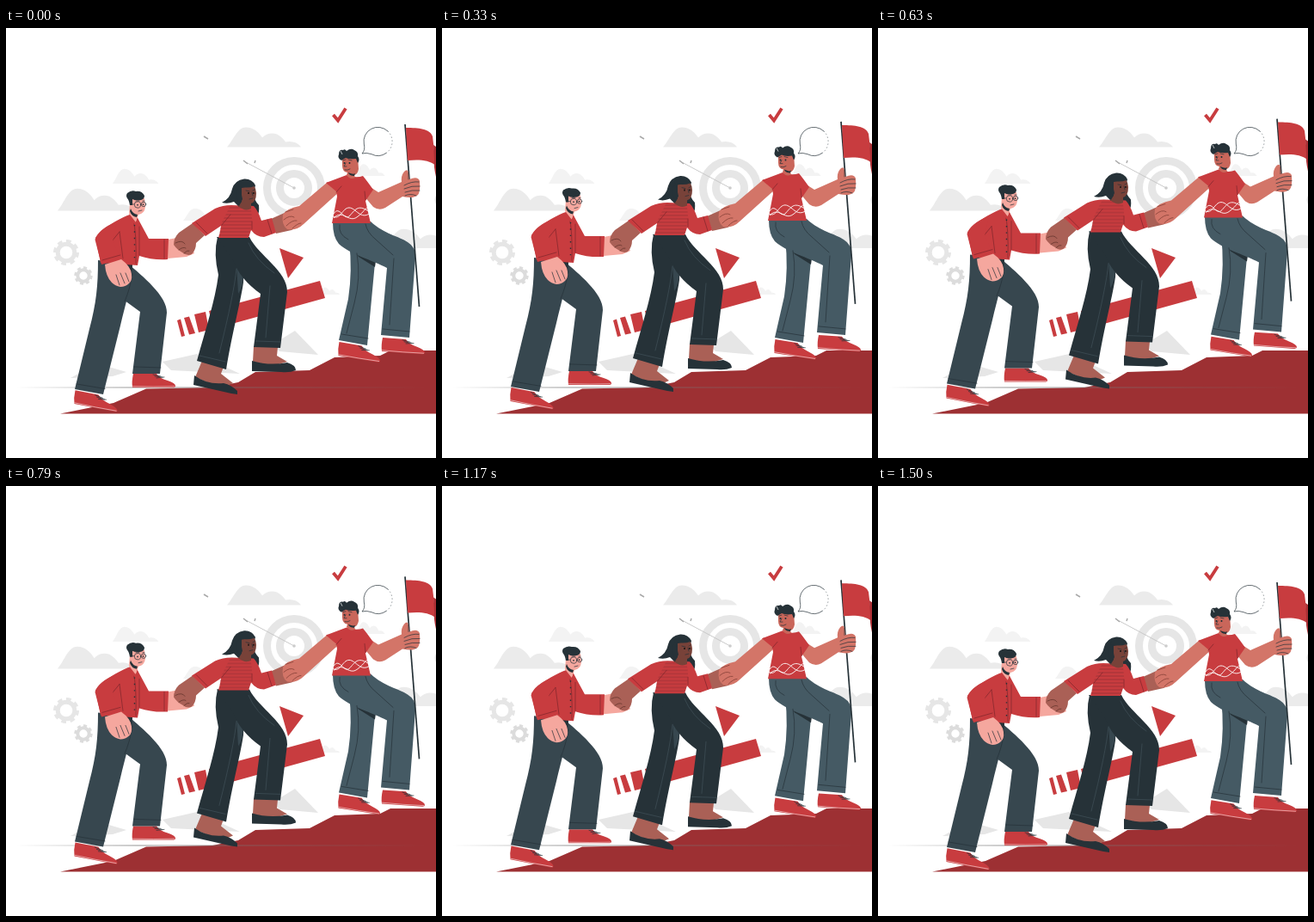
Write an HTML page that moves like this. It is 500 by 500 pixels and loops after 1540 ms.

```html
<!DOCTYPE html>
<html lang="en">
<head>
<meta charset="utf-8">
<title>Climbing together</title>
<style>
  html, body { margin: 0; height: 100%; overflow: hidden; background: #fff; }
  svg { display: block; width: 100vw; height: 100vh; }
  .red { fill: #c83c3f; }
  .dark { fill: #263238; }
  .slate { fill: #37474f; }
  .blue { fill: #455a64; }
  .pink { fill: #f5a79e; }
  .brown { fill: #aa6056; }
  .deep { fill: #784239; }
  .tan { fill: #d37568; }
  .gray { fill: #ebebeb; }
  .line { fill: none; stroke: #263238; stroke-width: .7; stroke-linecap: round; stroke-linejoin: round; }
  .seam { stroke: #7d262c; }
  .white { fill: none; stroke: #fff; stroke-width: .9; }
  .ring { fill: none; stroke: #e6e6e6; }
</style>
</head>
<body>
<svg viewBox="0 0 500 500">
  <defs>
    <linearGradient id="fade">
      <stop offset="0" stop-color="#777" stop-opacity="0"/>
      <stop offset=".3" stop-color="#777" stop-opacity=".8"/>
      <stop offset=".6" stop-color="#777" stop-opacity=".5"/>
      <stop offset="1" stop-color="#777" stop-opacity="0"/>
    </linearGradient>
    <pattern id="stripes" width="10" height="4" patternUnits="userSpaceOnUse">
      <path d="M0 1H10" stroke="#8f2c32" stroke-width=".7"/>
    </pattern>
    <path id="cloud" d="M0 0C8-9 12-23 22-23C31-23 37-17 41-11Q48-18 58-15Q64-12 68-6Q80-8 86 0Z"/>
    <g id="sneaker">
      <path class="red" d="M1 0L28 0Q31 5 41 8Q50 11 50 14Q50 16 47 16H0Q-1 9 1 0Z"/>
      <path class="white" d="M0 14.800Q25 15.500 49 14.800" stroke-width=".5" style="stroke-width:.5"/>
      <path class="line" d="M24 1L33 3M26 3L35 4M28 5L37 4"/>
    </g>
  </defs>

  <g class="gray">
    <use href="#cloud" x="257" y="138.500"/>
    <use href="#cloud" transform="translate(124 181) scale(.62 .75)" fill="#f3f3f3"/>
    <use href="#cloud" transform="translate(60 212.500) scale(1.04 1.12)"/>
    <use href="#cloud" transform="translate(407 172) scale(.39 .6)" fill="#f3f3f3"/>
    <use href="#cloud" transform="translate(440 256) scale(1.02 .97)"/>
    <use href="#cloud" transform="translate(365 310) scale(.27 .37)" fill="#f3f3f3"/>
    <use href="#cloud" transform="translate(206 224) scale(.62)" fill="#f3f3f3"/>
    <path d="M500 195Q497 199 500 205Z"/>
    <path fill="#e6e6e6" d="M75 407L106 390L140 400L124 405ZM182 388L222 379L272 402L192 398ZM310 368L336 352L363 380L318 376Z"/>
  </g>
  <circle class="ring" cx="335" cy="186" r="31.500" stroke-width="9"/>
  <circle class="ring" cx="335" cy="186" r="16.500" stroke-width="9"/>
  <path d="M277 155L335 186" stroke="#c4c4c4" stroke-width=".9"/>
  <circle cx="335" cy="186" r="1.800" fill="#ccc"/>
  <path d="M276 154L281 158M289 157L290 154M230 126L235 129" stroke="#aaa" stroke-width="1.500"/>

  <g fill="none" stroke="#e6e6e6">
    <circle cx="70" cy="261" r="9.800" stroke-width="5"/>
    <circle cx="70" cy="261" r="13" stroke-width="4" pathLength="16" stroke-dasharray="1.1 .9"/>
    <g stroke="#dcdcdc">
      <circle cx="90" cy="288" r="6.700" stroke-width="4"/>
      <circle cx="90" cy="288" r="9.200" stroke-width="3" pathLength="16" stroke-dasharray="1.1 .9"/>
    </g>
  </g>

  <path d="M380.500 101L386 107.500L395 93.500" fill="none" stroke="#c83c3f" stroke-width="3.800"/>
  <path class="line" d="M442 145.500A16.500 16.500 0 0 1 425 146.700Q419 144.500 414 146Q418 142 416.300 135A16.500 16.500 0 0 1 444 120"/>
  <path class="line" d="M444 120A16.500 16.500 0 0 1 442 145.500" stroke-dasharray="1 3" opacity=".6"/>

  <path class="red" d="M199 340L203 338.500L208 358L204 359ZM207 337L213 335.500L220 355L213 356.500ZM219 333L232 330L236 351L224 354ZM236 329L365 294L371 314L241 350ZM318 256L346 267L328 291Z"/>
  <path fill="#9d3033" d="M63 448.500L125 436L163 419.500L240 418L270 412L290 400L353 398L382 383L435 381L447 375H500V448.500Z"/>
  <path fill="url(#fade)" d="M12 417.500H490V418.500H12Z"/>

  <g id="team">
    <!-- man with glasses -->
    <g>
      <use href="#sneaker" x="147" y="402"/>
      <use href="#sneaker" transform="translate(79.500 421) skewY(11)"/>
      <path class="slate" d="M142 274C158 288 188 312 187 331L179 402L147 402L156 330L134 314Z"/>
      <path class="slate" d="M107 270L147 275C146 300 139 320 133 346L113 426L80 420L97 350C105 320 107 300 107 270Z"/>
      <path class="line" d="M149 394L180 395M82 414L115 419.500M147 286Q144 304 138 318"/>
      <path class="dark" d="M134 272L147 274L146 288Q140 296 134 291Z"/>
      <path class="pink" d="M188 246L204 243Q216 254 219 262L210 266L188 268Z"/>
      <path class="red" d="M141 218L152 219L166 245L189 245L188 269Q170 270 155 265L153 276L110 273L104 244C112 232 130 223 141 218Z"/>
      <path class="line seam" d="M148 222Q152 240 151 274M184 246L184 268M155 231L155 264M123 248L132 237M132 237L136 268"/>
      <path d="M149.500 229V272" stroke="#263238" stroke-width="1.400" stroke-dasharray="1.400 6"/>
      <path class="red" d="M129 225Q107 234 103.500 246L111 275L134 269L124 248Z"/>
      <path class="line seam" d="M112 270L133 264"/>
      <path class="pink" d="M115 275L134 269Q145 277 146 286Q147 294 143 297Q139 301 133 301Q127 300 123 296Q116 289 115 275Z"/>
      <path class="line" d="M128 287L132 299M133 285L138 297M139 285L143 295"/>
      <g class="head">
        <path class="pink" d="M144 204L143 216Q146 225 151 226L154 217Q161 216 162 208L161 198L145 198Z"/>
        <path class="dark" d="M145 210Q147 216 153 217L152 220Q146 219 144 213ZM141 192Q146 188 151 190Q158 189 161 195Q161 199 157 200Q150 201 147 199L147 206L144 206Q143 200 141 198Q139 195 141 192Z"/>
        <circle class="line" cx="153" cy="205.500" r="3.700"/>
        <circle class="line" cx="160" cy="205" r="2.700"/>
        <path class="line" d="M146 205H149M151 201L155 201M159 201L161 201M154 213L158 212"/>
        <path d="M153 205V206.500M159.500 204.500V206" stroke="#263238" stroke-width="1.500"/>
      </g>
      <path class="red" d="M141 218L144 217L151 226L153 221L155 231L148 227Z"/>
    </g>

    <!-- woman -->
    <g>
      <path class="brown" d="M228 387L253 394L250 402L264 413L250 419L220 406ZM288 370L316 371L315 381L327 388L310 393L287 388Z"/>
      <path class="dark" d="M219 404Q234 415 253 413Q262 415 269 422V426L262 425L218 415ZM286 387Q306 393 327 389Q337 392 337 398Q330 401 320 400L286 399Z"/>
      <path class="dark" d="M246 243L278 243L276 296C272 322 264 350 256 397L222 387C232 350 243 318 247 287Q241 262 246 243Z"/>
      <path class="slate" d="M268 274L276 288Q275 302 270 309Z"/>
      <path class="dark" d="M245 243H283C293 264 328 283 327 307L319 372L288 371L296 309Q272 292 264 270Z"/>
      <path d="M225 381L255 388M290 364L319 365M282 250Q290 270 312 285M268 280Q265 310 248 378M307 300L302 360" class="line" style="stroke:#46575f;stroke-width:.6"/>
      <path class="brown" d="M217 227L231 241L221 250Q221 258 216 263Q211 266 205 261Q199 258 195 252Q195 244 201 238Z"/>
      <path class="line" d="M197 250Q205 246 208 251M201 258Q206 254 209 256M207 262Q211 258 213 259" style="stroke:#5e3029"/>
      <path class="brown" d="M308 222L326 214L344 214L344 229L332 235L314 239Z"/>
      <path class="dark" d="M287 190Q288 200 294 206Q295 216 292 217Q284 213 279 204Z"/>
      <path class="red" d="M262 206L288 207Q293 212 297 224L309 221L314 238L300 243Q291 243 285 235L282 244H247Q249 238 250 230L232 242L216 227L243 210Q252 206 262 206Z"/>
      <path fill="url(#stripes)" d="M262 206L284 207Q288 222 284 236L282 244H247L251 226L260 208Z"/>
      <path class="line seam" d="M221 226L234 239M251 229L261 217M304 223L309 239M286 225L286 234"/>
      <g class="head">
        <path class="dark" d="M290 183Q286 175 277 175.500Q266 177 263 187Q261 198 251 203Q258 205 265 202L271 208L285 204Z"/>
        <path class="deep" d="M274 186L288 183Q291 187 291 192Q291 202 285 204L285 210Q278 214 270 207L274 202Z"/>
        <path class="dark" d="M270 184Q280 187 289 184L285 179H272ZM272 185L275 199L271 207L267 190Z"/>
        <path class="line" d="M279 189L283 190M287 189L289 188M283 199L287 198M286 191L287 195"/>
        <path d="M282 191V193M288 191V193" stroke="#111" stroke-width="1.400"/>
      </g>
    </g>

    <!-- leader with flag -->
    <g>
      <use href="#sneaker" transform="translate(386.500 365) scale(.97 1) skewY(9)"/>
      <use href="#sneaker" transform="translate(437 360) skewY(4)"/>
      <path class="blue" d="M399 248L429 273L420 369L387 363L398 315Q403 282 399 248Z"/>
      <path class="dark" d="M403 257L430 271L429 278L410 266Z"/>
      <path class="blue" d="M380 226L424 225C440 240 457 242 467 249Q477 255 476 267L469 360L436 357L443 279C426 270 400 263 387 251Q380 243 380 226Z"/>
      <path class="line" d="M390 356L421 361M438 350L469 353M408 262Q413 290 405 320L396 355M388 229Q386 240 398 246M418 228Q420 238 430 246L450 264M451 268L446 345"/>
      <path class="tan" d="M374 179L388 190L346 228Q338 236 327 234Q320 229 322 217Q326 210 341 207Z"/>
      <path class="line" d="M323 223Q330 217 335 220M326 230Q333 223 338 224M333 233Q339 227 343 227M325 214L334 211" style="stroke:#7c3a31"/>
      <path d="M464 112L480.500 324" stroke="#263238" stroke-width="1.700"/>
      <path class="red" d="M465 116C480 116 493 117 496 126L500 160C491 153 480 153 467 154Z"/>
      <path fill="#a92f34" d="M497 136L500 138V173Q497 160 498 153Z"/>
      <path class="tan" d="M422 184L433 191L460 179Q459 172 463 167Q467 163 468 168L469 176Q479 172 481 178Q482 190 479 194Q474 199 461 196L441 209Q434 213 427 208L416 195Z"/>
      <path class="line" d="M480 179Q472 178 463 183M481 184Q472 183 463 187M481 189Q472 188 464 191M477 195Q470 192 464 195M468 168L468 176"/>
      <path class="red" d="M372 180L396 171Q407 175 415 172Q420 178 427 188L418 201L424 227H379L385 196L384 190Z"/>
      <path class="white" d="M381 216C388 205 393 226 400 218S410 205 423 214M380 219C389 224 391 209 399 209S412 224 424 215M381 221C392 210 398 227 408 220S418 207 422 210"/>
      <path class="line seam" d="M384 191L390 184M418 200L417 190"/>
      <g class="head">
        <path fill="#c9665a" d="M391 150L409 150L410 164Q409 170 405 171L406 174Q400 177 396 171L397 168Q391 167 391 160Z"/>
        <path class="dark" d="M390 154Q385 151 387 147Q387 141 392 142Q394 140 396 143Q401 139 405 142Q410 144 409 149Q412 153 409 157L407 152Q399 153 395 151ZM398 168Q404 171 406 169L405 172Q399 172 398 168Z"/>
        <path class="line" d="M392 154L395 153M398 153L402 154M395 157L393 161L396 161M394 165Q397 166 400 164"/>
        <path d="M393.500 156V158M399.500 156V158" stroke="#263238" stroke-width="1.600"/>
        <path d="M389 143L391 147" stroke="#fff" stroke-width=".7"/>
      </g>
    </g>
  </g>
</svg>
<script>
  const LOOP = 1540, PEAK = 735;
  const team = document.getElementById("team");
  const heads = document.querySelectorAll(".head");
  const lift = (el, y) => el.setAttribute("transform", `translate(0 ${-y})`);

  function draw(now) {
    const rise = (1 + Math.cos((now - PEAK) / LOOP * 2 * Math.PI)) / 2;
    lift(team, 6.7 * rise);
    heads.forEach(head => lift(head, 0.7 * rise));
    requestAnimationFrame(draw);
  }
  draw(performance.now());
</script>
</body>
</html>
```
